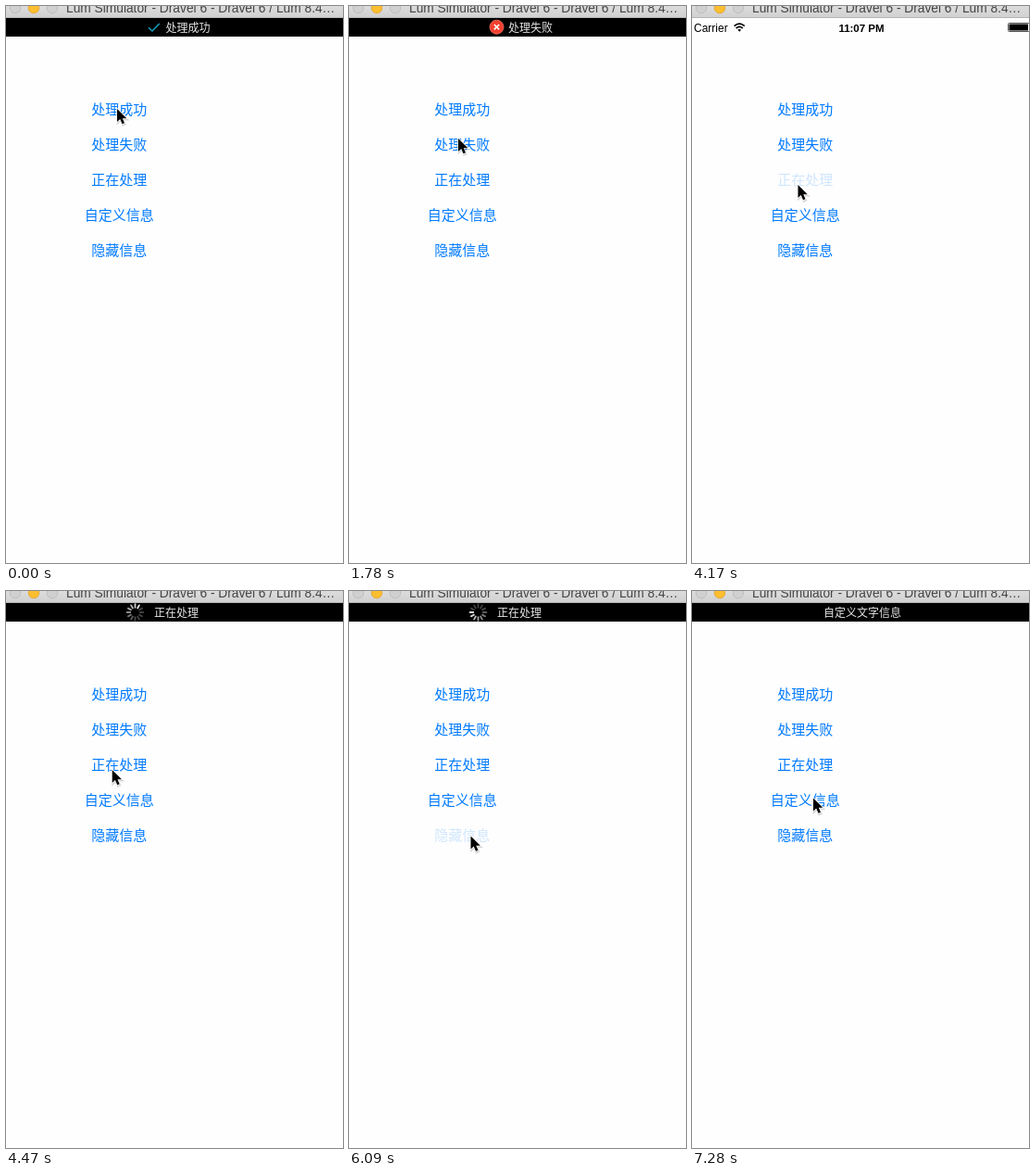
Animation, 364 px wide and 601 px high, one loop 8000 ms. Source, as an HTML page:

```html
<!DOCTYPE html>
<html lang="zh">
<head>
<meta charset="utf-8">
<style>
  html, body { margin: 0; width: 100%; height: 100%; overflow: hidden; background: #fefefe; }
  svg { display: block; width: 364px; height: 601px; }
  text { font-family: "Liberation Sans", "Noto Sans CJK SC", "Noto Sans CJK", sans-serif; }
  .cjk text, text.cjk { font-family: "Noto Sans CJK SC", "Noto Sans CJK", sans-serif; }
  #buttons { font-size: 15px; fill: #007aff; text-anchor: middle; }
</style>
</head>
<body>
<svg viewBox="0 0 364 601">
  <defs>
    <linearGradient id="chrome" x1="0" y1="0" x2="0" y2="1">
      <stop offset="0" stop-color="#dcdcdc"/>
      <stop offset="1" stop-color="#d0d0d0"/>
    </linearGradient>
  </defs>
  <rect width="364" height="601" fill="#fefefe"/>

  <g id="status">
    <text x="2" y="27.5" font-size="12">Carrier</text>
    <g fill="none" stroke="#000" stroke-width="1.7">
      <path d="M45.6 21.6Q51.2 16.6 56.8 21.6M47.7 24Q51.2 20.8 54.7 24"/>
      <path d="M51.2 27.7L49.3 25.7Q51.2 24.2 53.1 25.7Z" fill="#000" stroke="none"/>
    </g>
    <text x="183" y="27.5" font-size="11.5" font-weight="bold" text-anchor="middle">11:07 PM</text>
    <rect x="341.5" y="18.5" width="23" height="9" rx="1" fill="none" stroke="#555"/>
    <rect x="342.5" y="19.5" width="20.5" height="7"/>
  </g>

  <g id="buttons" class="cjk"></g>

  <g id="banner">
    <rect y="13" width="364" height="20"/>
    <text id="message" class="cjk" y="27.5" font-size="12" fill="#e6e6e6"></text>
    <path id="check" d="M154 23.3L158 27L165.7 19" fill="none" stroke="#17a3bd" stroke-width="1.5"/>
    <g id="cross">
      <circle cx="159.5" cy="22.7" r="7.5" fill="#f2402f" stroke="#f4766a" stroke-width=".8"/>
      <path d="M156.8 20L162.2 25.4M162.2 20L156.8 25.4" stroke="#fff" stroke-width="1.5"/>
    </g>
    <g id="spinner" transform="translate(139.5 23)" stroke="#fff" stroke-width="1.8" stroke-linecap="round"></g>
  </g>

  <g id="cursor">
    <path d="M0 0V14L3.2 11L5.5 16.3L8 15.2L5.8 10.2H10.3Z" transform="translate(.6 1.3)"
          fill="#000" stroke="#000" stroke-width="2" opacity=".16"/>
    <path d="M0 0V14L3.2 11L5.5 16.3L8 15.2L5.8 10.2H10.3Z"
          stroke="#fff" stroke-width="1.6" paint-order="stroke"/>
  </g>

  <g id="titlebar">
    <rect width="364" height="13" fill="url(#chrome)"/>
    <rect y="12" width="364" height="1" fill="#b4b4b4"/>
    <g stroke-width=".8">
      <circle cx="10" cy="2" r="5.8" fill="#d0d0d0" stroke="#b9b9b9"/>
      <circle cx="30" cy="2" r="5.8" fill="#fdbe2f" stroke="#e0a32a"/>
      <circle cx="50" cy="2" r="5.8" fill="#d0d0d0" stroke="#b9b9b9"/>
    </g>
    <text x="65" y="7" font-size="13.75" fill="#444">Lum Simulator - Dravel 6 - Dravel 6 / Lum 8.4…</text>
  </g>
</svg>
<script>
const LOOP = 8000, TICK = 148.7;
const SVG = 'http://www.w3.org/2000/svg';
const el = id => document.getElementById(id);

function add(parent, tag, attrs) {
  const node = document.createElementNS(SVG, tag);
  for (const key in attrs) node.setAttribute(key, attrs[key]);
  return parent.appendChild(node);
}

const buttons = ['处理成功', '处理失败', '正在处理', '自定义信息', '隐藏信息'].map((label, i) => {
  const node = add(el('buttons'), 'text', { x: 122.3, y: 116.7 + 38 * i });
  node.textContent = label;
  return node;
});

const spokes = Array.from({ length: 12 }, (_, i) =>
  add(el('spinner'), 'line', { y1: -5.2, y2: -8.8, transform: `rotate(${30 * i})` }));

// Times below are in ticks; a banner is half way at `show` and at `hide`.
const banners = [
  { text: '处理成功', x: 172.5, icon: 'check', show: -9, hide: 3 },
  { text: '处理失败', x: 172, icon: 'cross', show: 11, hide: 23 },
  { text: '正在处理', x: 160, icon: 'spinner', show: 29, hide: 42 },
  { text: '自定义文字信息', x: 142, icon: '', show: 48, hide: 99 }
];

const presses = [
  { button: 1, from: 10, to: 10 },
  { button: 2, from: 28, to: 28 },
  { button: 4, from: 41, to: 41 },
  { button: 3, from: 47, to: 47 }
];

// tick, x, y of the pointer tip
const path = [
  [3, 120, 111], [4, 120, 113], [6, 119, 127], [9, 118, 143], [25, 118, 143],
  [28, 114.5, 193], [33, 115, 193], [35, 162, 194], [36, 178, 201], [37, 174, 222],
  [39, 142, 260], [40, 132, 265], [42, 131, 264], [43, 132, 256], [44, 132, 243],
  [46, 131, 225], [47, 131, 223.5]
];

function pointerAt(n) {
  const next = path.findIndex(p => p[0] > n);
  if (next < 0) return path[path.length - 1].slice(1);
  if (next === 0) return path[0].slice(1);
  const a = path[next - 1], b = path[next];
  const k = (n - a[0]) / (b[0] - a[0]);
  return [a[1] + (b[1] - a[1]) * k, a[2] + (b[2] - a[2]) * k];
}

function buttonOpacity(i, n) {
  for (const p of presses) {
    if (p.button !== i || n < p.from) continue;
    if (n <= p.to) return 0.18;
    if (n === p.to + 1) return 0.65;
  }
  return 1;
}

function draw(time) {
  const n = Math.floor((time + 8) / TICK);

  const banner = banners.find(b => n >= b.show && n <= b.hide);
  el('banner').style.display = banner ? '' : 'none';
  if (banner) {
    const lift = n === banner.show || n === banner.hide ? -10 : 0;
    el('banner').setAttribute('transform', `translate(0 ${lift})`);
    el('message').textContent = banner.text;
    el('message').setAttribute('x', banner.x);
    for (const id of ['check', 'cross', 'spinner'])
      el(id).style.display = banner.icon === id ? '' : 'none';
  }

  const head = Math.floor(n * TICK * 12 / 1000) + 8;
  spokes.forEach((spoke, i) => {
    const lag = (head - i + 24) % 12;
    spoke.setAttribute('opacity', Math.max(0.25, 0.9 - lag * 0.09));
  });

  buttons.forEach((node, i) => node.setAttribute('opacity', buttonOpacity(i, n)));
  el('cursor').setAttribute('transform', `translate(${pointerAt(n)})`);
}

const start = performance.now();
function frame() {
  draw((performance.now() - start) % LOOP);
  requestAnimationFrame(frame);
}
frame();
</script>
</body>
</html>
```
